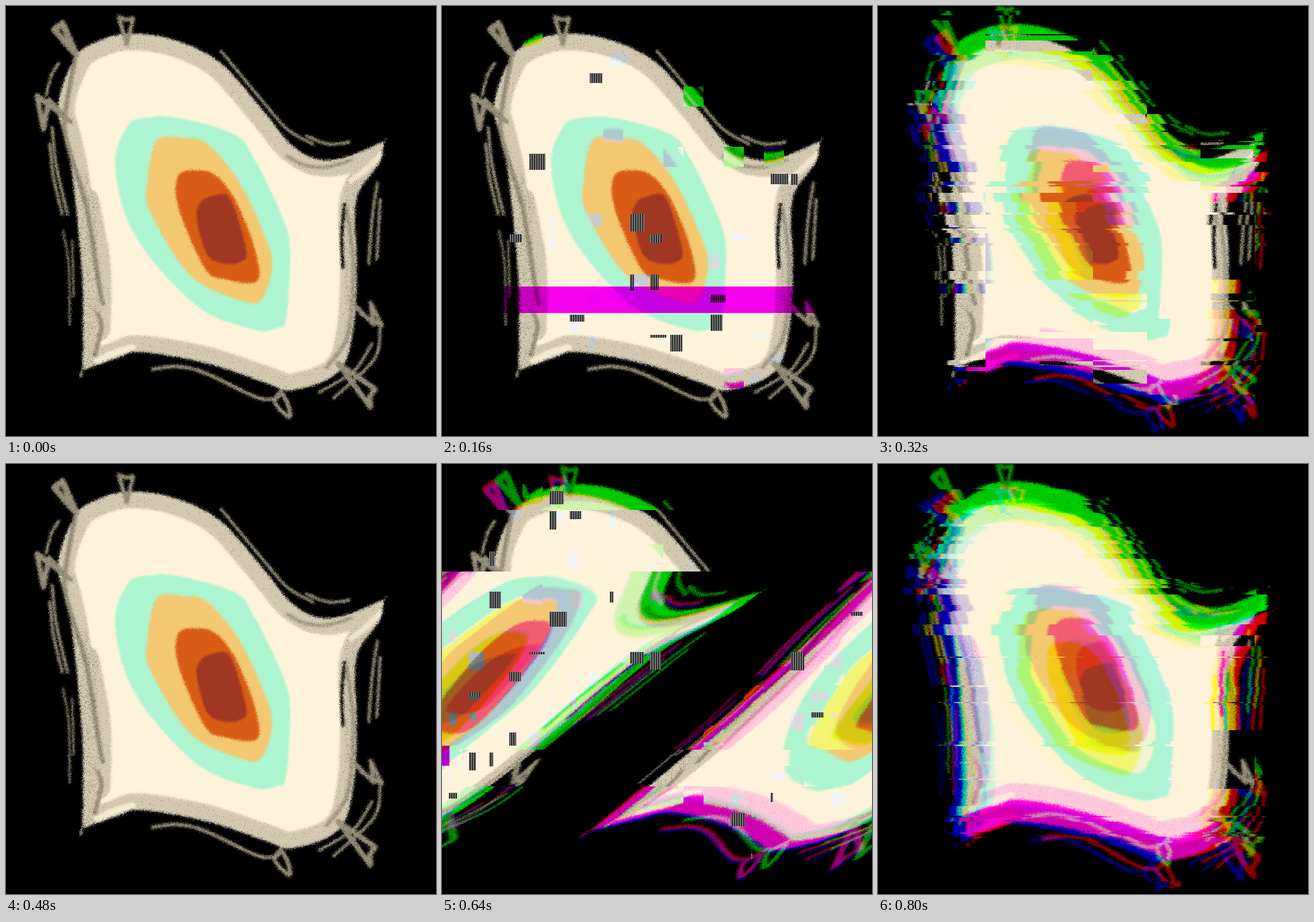
Animation of 748x748 px, one loop 880 ms. Source, as an HTML page with a canvas:

```html
<!DOCTYPE html>
<html lang="en">
<head>
<meta charset="utf-8">
<title>Glitching eye</title>
<style>
html, body { margin: 0; width: 100%; height: 100%; overflow: hidden; background: #000; }
canvas { display: block; width: 100vw; height: 100vh; }
</style>
</head>
<body>
<canvas id="stage" width="748" height="748"></canvas>
<script>
const N = 748, STEP = 80, LOOP = 880, CELL = 35;
const INK = '#989079', RIM = '#d2c9b0', CREAM = '#fef3da';
const stage = document.getElementById('stage').getContext('2d');

const rng = seed => () => {
  seed = seed + 0x6D2B79F5 | 0;
  let t = Math.imul(seed ^ seed >>> 15, 1 | seed);
  t = t + Math.imul(t ^ t >>> 7, 61 | t) ^ t;
  return ((t ^ t >>> 14) >>> 0) / 4294967296;
};

// Smooth path through points; a repeated point makes a corner.
function spline(text, closed) {
  const p = text.trim().split(/\s+/).map(s => s.split(',').map(Number));
  const n = p.length, path = new Path2D();
  const at = i => closed ? p[(i + n) % n] : p[Math.max(0, Math.min(n - 1, i))];
  path.moveTo(...p[0]);
  for (let i = 0; i < (closed ? n : n - 1); i++) {
    const [a, b, c, d] = [at(i - 1), at(i), at(i + 1), at(i + 2)];
    path.bezierCurveTo(b[0] + (c[0] - a[0]) / 6, b[1] + (c[1] - a[1]) / 6,
      c[0] - (d[0] - b[0]) / 6, c[1] - (d[1] - b[1]) / 6, ...c);
  }
  return path;
}

function paint() {
  const g = new OffscreenCanvas(N, N).getContext('2d');
  const fill = (color, text) => { g.fillStyle = color; g.fill(spline(text, true)); };
  const draw = (path, width, color) => {
    g.strokeStyle = color;
    g.lineWidth = width;
    g.stroke(path);
  };
  const line = (width, text, color = INK) => draw(spline(text), width, color);
  const spike = (width, text) => draw(new Path2D('M' + text.replace(/ /g, 'L')), width, INK);
  g.lineCap = g.lineJoin = 'round';
  g.fillStyle = '#000';
  g.fillRect(0, 0, N, N);

  // loose lines around the shape
  line(5, '92,100 79,120 70,155');
  line(5, '80,212 88,280 107,362');
  line(5, '76,240 83,300 98,362');
  line(3, '99,390 109,450 111,555');
  line(3, '115,408 118,505');
  line(5, '374,78 450,170 490,215 534,240');
  line(5, '523,226 560,240 597,237');
  line(5, '646,308 637,370 631,448');
  line(5, '651,336 645,440');
  line(5, '651,560 640,615 570,682');
  line(5, '636,588 605,635 545,672');
  line(6, '255,632 300,627 350,640 440,682 475,680');

  // body: a cream field with a grey rim kept inside its outline
  const body = spline(`120,90 160,61 215,48 290,58 372,98 450,185 495,240 540,266 590,263
    658,235 658,235 650,272 613,325 607,380 610,430 606,550 580,635 500,668 450,655 350,622
    235,602 195,612 133,634 133,634 133,480 116,300 103,235 91,170`, true);
  g.save();
  g.clip(body);
  g.fillStyle = CREAM;
  g.fill(body);
  draw(body, 58, RIM);
  line(48, '138,340 158,450 158,560', RIM);
  line(12, '160,618 185,605 220,594', '#f3ead1');
  line(10, '600,304 628,282 652,258', '#eee5cc');
  g.restore();
  line(5, '589,345 584,400 586,455', '#000');
  line(8, '120,94 104,180 105,232 140,350 161,480 168,518');
  line(7, '160,535 166,560 155,606');
  line(6, '490,262 520,277 560,280 600,268', '#a59d87');
  line(7, '592,350 604,450 595,570 558,628', '#a59d87');

  spike(11, '121,84 84,41 98,30 122,84');
  spike(7, '210,67 196,19 208,24 221,22 210,67');
  spike(9, '112,201 54,156 65,214 75,164 102,192');
  spike(7, '608,522 640,554 634,516 654,556 618,536');
  spike(9, '578,622 634,698 633,679 642,666 578,622');
  line(7, '478,670 468,690 493,715 490,692 478,670');

  // the eye, ring by ring
  fill('#adf4d0', `212,208 250,194 300,195 395,222 430,262 482,370 494,430 487,545 470,560
    430,563 330,520 225,400 190,280`);
  fill('#f3c871', `262,234 310,230 350,240 405,305 452,405 463,455 445,510 410,513 320,468
    252,360 246,310`);
  fill('#d85c14', '300,295 335,286 368,297 400,340 432,420 437,478 380,475 345,455 300,350');
  fill('#a03722', '338,342 360,330 390,335 418,425 408,445 380,448 350,432 332,370');
  return chalk(g.getImageData(0, 0, N, N).data);
}

// Crumbles edges and adds grain to the grey parts.
function chalk(src) {
  const out = new Uint8ClampedArray(src.length), rand = rng(21);
  const near = (v, reach) => Math.max(0, Math.min(N - 1, v + Math.round((rand() - .5) * reach)));
  for (let y = 0; y < N; y++) for (let x = 0; x < N; x++) {
    const o = (y * N + x) * 4;
    const [a, b, c] = [3, 9, 6].map(reach => (near(y, reach) * N + near(x, reach)) * 4);
    const r = src[o], warm = r - src[o + 2];
    const grey = r > 130 && r < 225 && warm > 20 && warm < 50;
    const side = y > 290 && (x < 160 || x > 588);
    const k = grey && rand() < (side ? .12 : r < 170 ? .08 : .02) ? .65 : 1;
    for (let i = 0; i < 3; i++) out[o + i] = (src[a + i] + src[b + i] + src[c + i]) / 3 * k;
    out[o + 3] = 255;
  }
  return out;
}

// Runs fn(x, y, offset) over a box.
function each([x0, y0, w, h], fn) {
  for (let y = y0; y < Math.min(N, y0 + h); y++)
    for (let x = x0; x < Math.min(N, x0 + w); x++) fn(x, y, (y * N + x) * 4);
}

const STILL = [[0, 0], [0, 0], [0, 0]];
const NEAR = [[-9, 3], [13, -13], [-5, 7]];

// Copies a box with each colour channel taken from its own offset.
function split(out, src, box, shift, dx = 0) {
  each(box, (x, y, o) => {
    for (let c = 0; c < 3; c++) {
      const u = x - dx - shift[c][0], v = y - shift[c][1];
      out[o + c] = u < 0 || v < 0 || u >= N || v >= N ? 0 : src[(v * N + u) * 4 + c];
    }
  });
}

const bars = (out, box) => each(box, (x, y, o) => {
  const v = x & 2 ? 122 : 42;
  out.set([v + 12 * Math.sin(x), v + 12 * Math.sin(x * 1.7), v + 12 * Math.cos(x)], o);
});

const wash = (out, box) => each(box, (x, y, o) => {
  const v = out[o] * .3 + out[o + 1] * .59 + out[o + 2] * .11;
  out.set([v * .98, v, v * 1.01], o);
});

const magenta = (out, box) => each(box, (x, y, o) => {
  const top = Math.max(out[o], out[o + 1], out[o + 2]);
  out.set([(out[o] + top) * .485, 0, (out[o + 2] + top) * .505], o);
});

// Broken blocks on a loose grid, only where the picture is not black.
function scatter(src, seed, count) {
  const out = src.slice(), rand = rng(seed);
  const cell = () => CELL * Math.floor(rand() * N / CELL);
  const size = () => 3 + Math.floor(rand() * 30);
  while (count > 0) {
    const x = cell() + 24, y = cell() + 24;
    if (x >= N || y >= N || !src[(y * N + x) * 4]) continue;
    if (count % 6 === 0) split(out, src, [x - 24, y - 24, CELL, CELL], NEAR);
    else (count % 2 ? wash : bars)(out, [x - 12, y - 12, size(), size()]);
    count--;
  }
  return out;
}

function band(src) {
  const out = scatter(src, 4, 42);
  magenta(out, [0, 488, N, 46]);
  return out;
}

// Lower three quarters slide sideways, further the higher they are, and wrap.
function slant(src) {
  const mid = src.slice(), out = src.slice();
  split(mid, src, [0, 0, N, N], NEAR);
  split(mid, src, [0, 80, N, 107], STILL);
  split(mid, src, [0, 497, N, 64], STILL);
  each([0, 0, N, N], (x, y, o) => {
    const dx = y < N / 4 ? 0 : Math.round((N - y) * 1.2);
    const s = (y * N + (x - dx + 2 * N) % N) * 4;
    out.set(mid.subarray(s, s + 3), o);
  });
  return scatter(out, 8, 70);
}

// Rows torn in strips; eight columns split their colours, less so near calm spots.
function tear(src, seed, shift, level, spots) {
  const out = src.slice(), rand = rng(seed), W = N / 8;
  const luck = Array.from({ length: 64 }, rand);
  for (let y = 0, h; y < N; y += h) {
    h = 2 + Math.floor(rand() ** 1.6 * 18);
    const slide = rand() < .5 ? Math.round((rand() - .5) * 28) : 0;
    for (let c = 0; c < 8; c++) {
      const x = Math.round(c * W), w = Math.round((c + 1) * W) - x;
      const calm = Math.min(1, ...spots.map(([u, v, r]) => Math.hypot(x + W / 2 - u, y - v) / r));
      const dice = luck[Math.floor(y / W) * 8 + c] * .6 + rand() * .4;
      const on = dice < level * calm ** 2;
      split(out, src, [x, y, w, h], on ? shift : STILL, calm < .6 ? 0 : slide);
    }
  }
  return out;
}

const calm = paint();
const light = scatter(calm, 5, 20), block = band(calm), spark = scatter(calm, 9, 20);
const skew = slant(calm);
const torn = tear(calm, 11, [[20, 16], [13, -17], [0, 24]], .66, [[530, 430, 170], [150, 540, 110]]);
const wild = tear(calm, 34, [[20, 20], [12, -18], [-2, 24]], .95, [[590, 520, 90]]);

const order = [calm, light, block, calm, torn, torn, calm, spark, skew, calm, wild];
const images = new Map(order.map(d => [d, new ImageData(d, N, N)]));

let start, shown;
function show(data) {
  if (data === shown) return;
  stage.putImageData(images.get(data), 0, 0);
  shown = data;
}
function tick(now) {
  start ??= now;
  show(order[Math.floor((now - start) % LOOP / STEP)]);
  requestAnimationFrame(tick);
}
show(calm);
requestAnimationFrame(tick);
</script>
</body>
</html>
```
